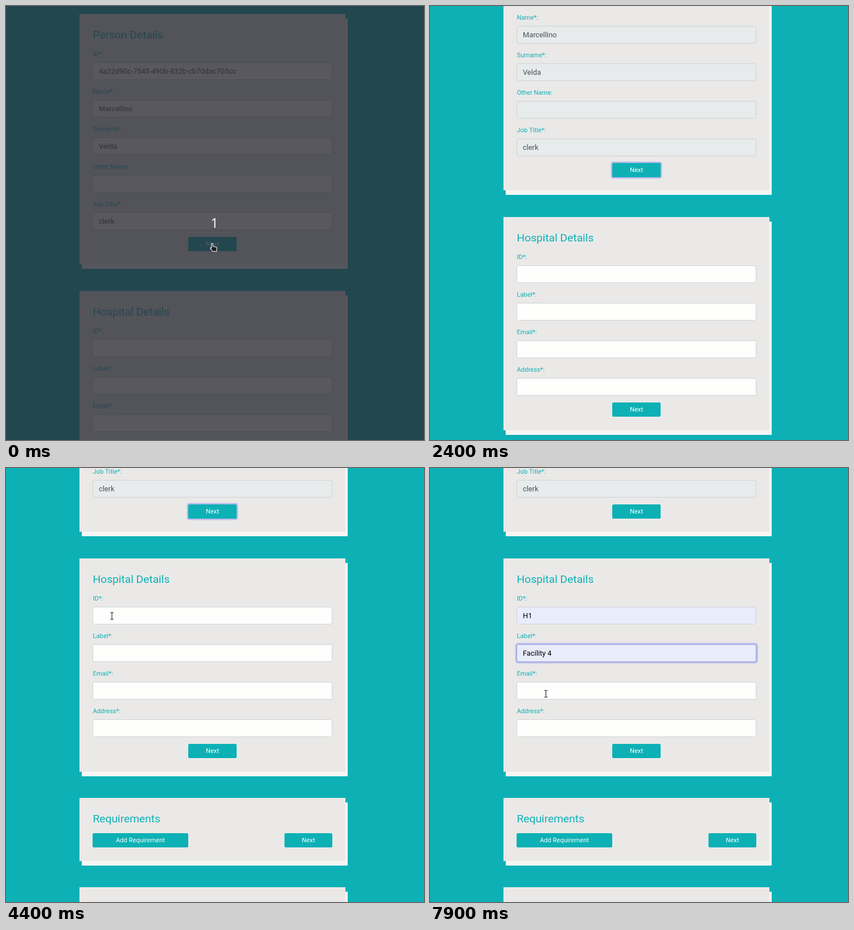
Animation of 734x763 px, one loop 8000 ms. Source, as an HTML page:

```html
<!DOCTYPE html>
<html lang="en">
<head>
<meta charset="utf-8">
<title>Order form</title>
<style>
  html, body { margin: 0; width: 100%; height: 100%; overflow: hidden; background: #0db1b5; }
  svg { display: block; font: 12.8px Roboto, sans-serif; }
  .title { font-size: 19.2px; fill: #0db1b5; }
  .label { font-size: 11.2px; fill: #0db1b5; }
  .btn { font-size: 11.2px; fill: #fefefd; text-anchor: middle; }
  .value { fill: #495057; }
  .filled { fill: #000; }
  .preview { font-family: "Noto Sans", sans-serif; fill: #000; }
  .item { font: 500 13px "Noto Sans", sans-serif; fill: #1d1d1f; }
  .count { font: 24px "Open Sans", sans-serif; fill: #fff; text-anchor: middle; }
  .menu { filter: drop-shadow(0 1px 1.5px rgba(0, 0, 0, .45)); }
</style>
</head>
<body>
<svg id="stage" width="734" height="763" viewBox="0 0 734 763"></svg>
<script>
const LOOP = 8000, STEP = 100, SCROLL = 342;
const WHITE = '#fefefd', TEAL = '#0db1b5', RING = '#b9bcea', AUTOFILL = '#e8ecfb';
const ID_Y = 586, LABEL_Y = 652, PITCH = 66;

const SHAPES = {
  arrow: '<path d="M0 0V14L3.3 11L5.5 16L7.8 15L5.6 10.2H10Z" fill="#111" stroke="#fff" stroke-width=".9"/>',
  beam: ['stroke="#fff" stroke-width="2.6"', 'stroke="#222" stroke-width="1.1"'].map(style =>
    `<path d="M-3-6H-1Q0-6 0-5Q0-6 1-6H3M0-5V5M-3 6H-1Q0 6 0 5Q0 6 1 6H3" fill="none" ${style}/>`).join(''),
  hand: `<path d="M-1.2 1Q0-.5 1.3 1V5.5L6.5 6.8Q8.6 7.4 8.3 9.5L7.5 14.5H1.2L-3.3 9.4Q-3.7 7.2-1.2 8.4Z"
    fill="#222" stroke="#fff" stroke-width="1.1" stroke-linejoin="round"/>`
};

// Pointer paths: [time, x, y]; the pointer is hidden between the two runs.
const RUNS = [
  { from: 0, to: 1500, keys: [[0, 362, 417], [1200, 362, 417], [1400, 390, 465]] },
  { from: 3600, to: LOOP, keys: [
    [3600, 523, 498], [3900, 330, 350], [4200, 161, 264], [4400, 186, 260],
    [5400, 186, 260], [5600, 190, 290], [5700, 191, 296], [5900, 191, 296],
    [6200, 200, 322], [6700, 200, 322], [6800, 200, 325], [7000, 205, 357],
    [7100, 205, 357], [7500, 214, 324], [7700, 214, 324], [7800, 208, 400], [7900, 203.5, 397]] }
];

const clamp = v => Math.max(0, Math.min(1, v));
const during = (t, a, b) => t >= a && t < b;
const fade = (t, start) => clamp((t - start + 50) / 100);
const mix = (a, b, k) => `rgb(${a.map((v, i) => Math.round(v + (b[i] - v) * k))})`;

const rect = (x, y, w, h, fill, extra = '') =>
  `<rect x="${x}" y="${y}" width="${w}" height="${h}" fill="${fill}" ${extra}/>`;
const text = (x, y, cls, str) => `<text x="${x}" y="${y}" class="${cls}">${str}</text>`;

const card = (y, h, title) =>
  rect(133, y + 8, 467, h, '#f7f6f5') + rect(129, y, 467, h, '#eae9e8') + text(152.5, y + 43, 'title', title);

const button = (x, y, w, str, ring = 0) =>
  rect(x - 2.5, y - 2.5, w + 5, 30, RING, `rx="4.5" opacity="${ring}"`) +
  rect(x, y, w, 25, TEAL, 'rx="2.6"') + text(x + w / 2, y + 16, 'btn', str);

function field(y, label, { fill = WHITE, value = '', cls = 'value', ring = 0, caret = false } = {}) {
  return text(152.5, y - 11, 'label', label) +
    rect(149.8, y - 2.5, 426, 36, RING, `rx="5" opacity="${ring}"`) +
    rect(152.5, y + .5, 420, 30, fill, `rx="3" stroke="${mix([206, 210, 213], [155, 161, 230], ring)}"`) +
    text(163, y + 20, cls, value) +
    (caret ? rect(163, y + 7, 1, 16, '#333') : '');
}

function menu(y, items, hover) {
  const top = y + 32;
  return rect(152, top, 154, 12 + 29 * items.length, WHITE, 'rx="3" class="menu"') +
    (hover ? rect(152, top + 6, 154, 29, '#e6e6e6') : '') +
    items.map((s, i) => text(161.5, top + 25 + 29 * i, 'item', s)).join('');
}

// State of a field that is focused, previewed from its menu and then filled.
const autofill = (t, value, { focus, blur, hover, pick }) => ({
  ring: t < focus ? 0 : t < blur ? fade(t, focus) : 1 - fade(t, blur),
  caret: during(t, focus, hover - 50),
  fill: t >= hover ? AUTOFILL : WHITE,
  value: t >= hover ? value : '',
  cls: t >= pick ? 'filled' : 'preview'
});

function pointer(t) {
  const run = RUNS.find(r => during(t, r.from, r.to));
  if (!run) return '';
  const { keys } = run;
  let i = 0;
  while (i < keys.length - 2 && keys[i + 1][0] <= t) i++;
  const [t0, x0, y0] = keys[i], [t1, x1, y1] = keys[i + 1];
  const k = clamp((t - t0) / (t1 - t0));
  const x = x0 + (x1 - x0) * k, y = y0 + (y1 - y0) * k;
  const row = y + SCROLL - ID_Y;
  const overField = during(x, 152, 573) && during(row, 0, 4 * PITCH) && row % PITCH < 31;
  const overMenu = during(t, 5500, 6000) || during(t, 6800, 7200);
  const shape = t < 1300 ? 'hand' : t > 3000 && overField && !overMenu ? 'beam' : 'arrow';
  return `<g transform="translate(${x} ${y})">${SHAPES[shape]}</g>`;
}

function scene(t) {
  const scroll = Math.round(SCROLL * (1 - (1 - clamp((t - 2100) / 1200)) ** 1.67));
  const locked = t < 800 ? 0 : fade(t, 800);
  const lockedFill = mix([254, 254, 253], [231, 235, 236], locked);
  const nextRing = t < 4900 ? locked : 1 - fade(t, 4900);

  const person = [['ID*:', '4a22d90c-7545-490b-832b-cb70dac705cc'], ['Name*:', 'Marcellino'],
    ['Surname*:', 'Velda'], ['Other Name:', ''], ['Job Title*:', 'clerk']];
  const idState = autofill(t, 'H1', { focus: 4900, blur: 6400, hover: 5600, pick: 6000 });
  const labelState = autofill(t, 'Facility 4', { focus: 6400, blur: LOOP, hover: 6900, pick: 7200 });

  const page =
    card(14, 440, 'Person Details') +
    person.map(([label, value], i) => field(99 + PITCH * i, label, { value, fill: lockedFill })).join('') +
    button(320, 406, 85, 'Next', nextRing) +
    card(501, 375, 'Hospital Details') +
    field(ID_Y, 'ID*:', idState) +
    field(LABEL_Y, 'Label*:', labelState) +
    field(LABEL_Y + PITCH, 'Email*:') +
    field(LABEL_Y + 2 * PITCH, 'Address*:') +
    button(320, 827, 85, 'Next') +
    card(922, 111, 'Requirements') +
    button(152, 984, 168, 'Add Requirement') + button(489, 984, 84, 'Next') +
    card(1079, 111, '') +
    (during(t, 5000, 6000) ? menu(ID_Y, ['H1'], t >= 5600) : '') +
    (during(t, 6500, 7200) ? menu(LABEL_Y, ['Facility 4', 'Provider5'], t >= 6900) : '');

  const countdown = t < 500
    ? rect(0, 0, 734, 763, '#292a33', 'opacity=".78"') + text(366, 390, 'count', '1') : '';

  return rect(0, 0, 734, 763, TEAL) +
    `<g transform="translate(0 ${-scroll})">${page}</g>` + countdown + pointer(t);
}

const stage = document.getElementById('stage');
const start = performance.now();
let shown = -1;
function tick() {
  const t = Math.floor((performance.now() - start) % LOOP / STEP) * STEP;
  if (t !== shown) stage.innerHTML = scene(shown = t);
  requestAnimationFrame(tick);
}
tick();
</script>
</body>
</html>
```
